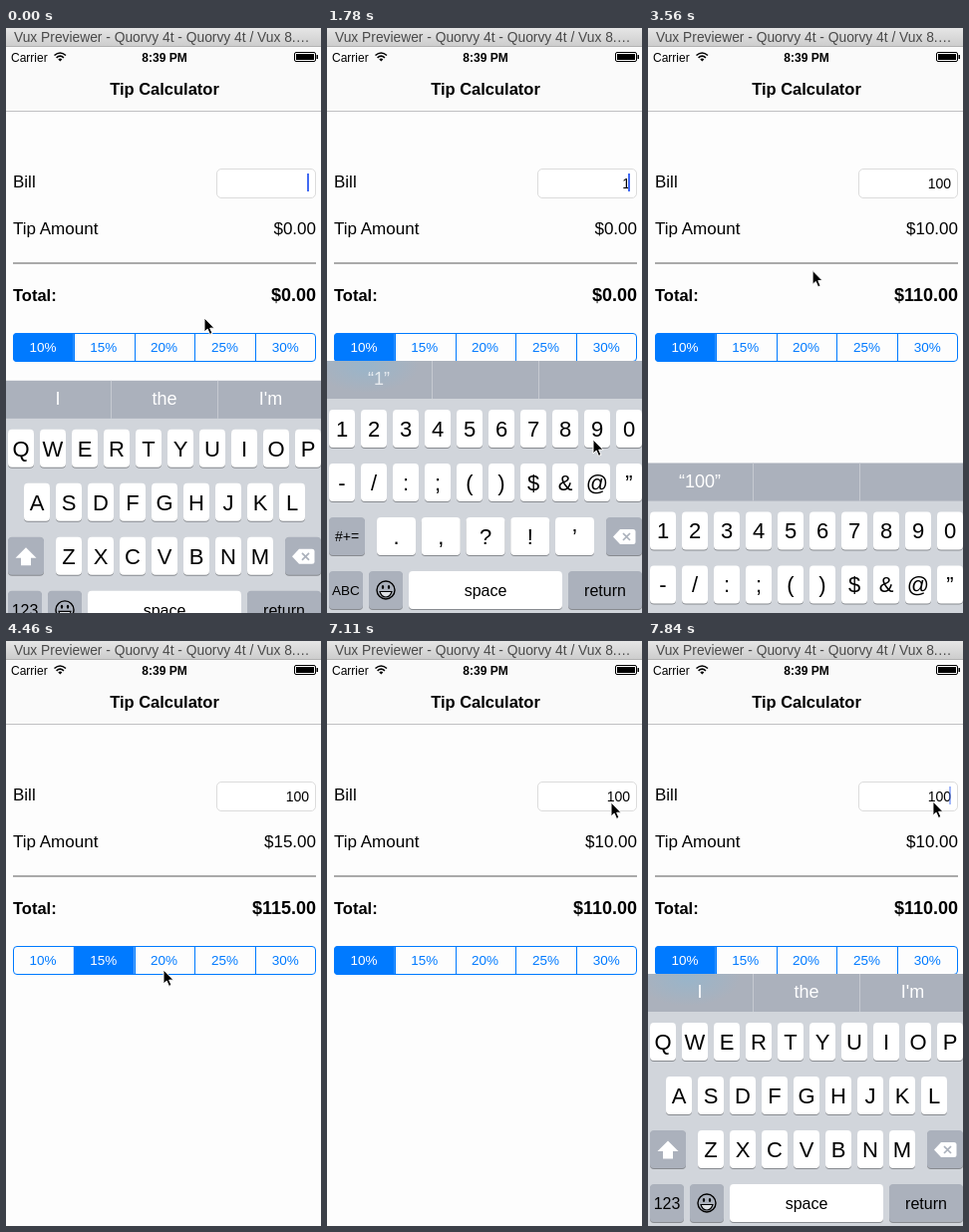
Recreate the animation shown at these times as an HTML page. Size 316x587 px, loop 7.99 s.

```html
<!DOCTYPE html>
<html lang="en">
<head>
<meta charset="utf-8">
<title>Tip Calculator</title>
<style>
html, body { margin: 0; width: 100%; height: 100%; overflow: hidden; background: #fdfdfd; }
svg { display: block; width: 316px; height: 587px; font-family: "Liberation Sans", Arial, sans-serif; }
</style>
</head>
<body>
<svg id="stage" viewBox="0 0 316 587">
  <defs>
    <linearGradient id="chrome" x2="0" y2="1">
      <stop stop-color="#e6e6e6"/><stop offset="1" stop-color="#cdcdcd"/>
    </linearGradient>
    <radialGradient id="tint">
      <stop stop-color="#92b6cf" stop-opacity=".75"/><stop offset="1" stop-color="#92b6cf" stop-opacity="0"/>
    </radialGradient>
    <clipPath id="pill"><rect x="7" y="306" width="304" height="29" rx="4"/></clipPath>
    <clipPath id="barClip"><rect width="316" height="38"/></clipPath>
  </defs>
</svg>
<script>
const LOOP = 7990, KEYBOARD_Y = 334, KEYBOARD_H = 253;
const BLUE = '#007aff', DARK_KEY = '#abb1bc';
const stage = document.getElementById('stage');

function add(parent, tag, attrs, content) {
  const node = document.createElementNS('http://www.w3.org/2000/svg', tag);
  for (const name in attrs) node.setAttribute(name, attrs[name]);
  if (content !== undefined) node.textContent = content;
  return parent.appendChild(node);
}
const rect = (parent, x, y, width, height, fill, more) =>
  add(parent, 'rect', { x, y, width, height, fill, ...more });
const text = (parent, x, y, size, content, more) =>
  add(parent, 'text', { x, y, 'font-size': size, ...more }, content);
const path = (parent, d, more) => add(parent, 'path', { d, ...more });
const BOLD = { 'font-weight': 'bold' };
const MIDDLE = { 'text-anchor': 'middle' };
const END = { 'text-anchor': 'end' };

// Window title, status bar and navigation bar
rect(stage, 0, 0, 316, 587, '#fdfdfd');
rect(stage, 0, 0, 316, 83, '#fafafa');
rect(stage, 0, 83, 316, 1, '#c0c0c2');
rect(stage, 0, 0, 316, 18, 'url(#chrome)');
rect(stage, 0, 18, 316, 1, '#b2b2b2');
text(stage, 8, 13.5, 13.8, 'Vux Previewer - Quorvy 4t - Quorvy 4t / Vux 8.…', { fill: '#4a4a4a' });
text(stage, 5, 33.5, 12, 'Carrier');
path(stage, 'M48.5 27.5Q54.3 22.5 60 27.5M50.6 29.8Q54.3 26.5 57.9 29.8',
  { fill: 'none', stroke: '#000', 'stroke-width': 1.6 });
path(stage, 'M52.3 31.4Q54.3 29.8 56.3 31.4L54.3 33.6Z');
text(stage, 159, 33.5, 12, '8:39 PM', { ...BOLD, ...MIDDLE });
rect(stage, 289.5, 24.5, 21, 9, 'none', { rx: 1.5, stroke: '#000' });
rect(stage, 291, 26, 18, 6, '#000');
rect(stage, 311.5, 27, 1.5, 4, '#000');
text(stage, 159, 67, 16.5, 'Tip Calculator', { ...BOLD, ...MIDDLE });

// Form
text(stage, 7, 160, 17, 'Bill');
rect(stage, 211.5, 141.5, 99, 29, '#fff', { rx: 4.5, stroke: '#dcdcdc' });
const billText = text(stage, 304, 161, 14, '', END);
const caret = rect(stage, 302, 146, 2, 18, '#426bf2');
text(stage, 7, 207, 17, 'Tip Amount');
const tipText = text(stage, 311, 207, 17, '', END);
rect(stage, 7, 235, 304, 2, '#aaa');
text(stage, 7, 274, 16.5, 'Total:', BOLD);
const totalText = text(stage, 311, 274, 18, '', { ...BOLD, ...END });

// Percentage selector
const segments = [10, 15, 20, 25, 30].map((percent, i) => {
  const x = 7 + i * 60.8;
  return {
    fill: rect(stage, x, 306, 60.8, 29, BLUE, { 'clip-path': 'url(#pill)' }),
    label: text(stage, x + 30, 325, 13.5, percent + '%', MIDDLE),
  };
});
for (let i = 1; i < 5; i++) rect(stage, Math.round(7 + i * 60.8), 306, 1, 29, BLUE);
rect(stage, 7.5, 306.5, 303, 28, 'none', { rx: 3.5, stroke: BLUE });

// Keyboard
const keyboard = add(stage, 'g', {});
rect(keyboard, 0, 0, 316, KEYBOARD_H, '#d1d5db');
rect(keyboard, 0, 0, 316, 38, DARK_KEY);
const tint = add(keyboard, 'ellipse',
  { cx: 40, cy: 4, rx: 52, ry: 28, fill: 'url(#tint)', 'clip-path': 'url(#barClip)' });
for (const x of [105, 212]) rect(keyboard, x, 0, 1, 38, '#c6cad1');
const suggestions = [52, 159, 265.5].map(x =>
  text(keyboard, x, 24, 18, '', { ...MIDDLE, fill: '#fff' }));

function key(parent, x, y, width, label = '', size = 22, fill = '#fff') {
  rect(parent, x, y + 1, width, 38, '#888b90', { rx: 4 });
  rect(parent, x, y, width, 38, fill, { rx: 4 });
  text(parent, x + width / 2, y + 19 + size * .36, size, label, MIDDLE);
}
function row(parent, labels, x, y, pitch = 32, width = 26) {
  [...labels].forEach((label, i) => key(parent, x + i * pitch, y, width, label));
}
const letters = add(keyboard, 'g', {});
row(letters, 'QWERTYUIOP', 2, 49);
row(letters, 'ASDFGHJKL', 18, 103);
row(letters, 'ZXCVBNM', 50, 157);
key(letters, 2, 157, 36, '', 16, DARK_KEY);
path(letters, 'M20 167.5L30.5 178H25V185.5H15V178H9.5Z', { fill: '#fff' });
key(letters, 2, 211, 34, '123', 16, DARK_KEY);

const numbers = add(keyboard, 'g', {});
row(numbers, '1234567890', 2, 49);
row(numbers, '-/:;()$&@”', 2, 103);
row(numbers, '.,?!’', 50, 157, 44.75, 39);
key(numbers, 2, 157, 36, '#+=', 14, DARK_KEY);
key(numbers, 2, 211, 34, 'ABC', 13.5, DARK_KEY);

key(keyboard, 280, 157, 36, '', 16, DARK_KEY);
path(keyboard, 'M287 176.5L294 169H307Q309.5 169 309.5 171.5V181.5Q309.5 184 307 184H294Z', { fill: '#fff' });
path(keyboard, 'M297 173L304 180M304 173L297 180', { stroke: DARK_KEY, 'stroke-width': 1.7 });
key(keyboard, 42, 211, 34, '', 16, DARK_KEY);
add(keyboard, 'circle', { cx: 59, cy: 230, r: 9, fill: 'none', stroke: '#000', 'stroke-width': 1.4 });
for (const cx of [56, 62]) add(keyboard, 'ellipse', { cx, cy: 227, rx: 1.2, ry: 2 });
path(keyboard, 'M53 231.5H65Q63.5 237 59 237T53 231.5Z',
  { fill: '#dfe2e6', stroke: '#000', 'stroke-width': 1.1 });
key(keyboard, 82, 211, 154, 'space', 16);
key(keyboard, 242, 211, 74, 'return', 16, DARK_KEY);

const pointer = path(stage, 'M0 0V14L3.2 11.1L5.5 16.4L8 15.3L5.7 10.2H10Z',
  { stroke: '#fff', 'stroke-width': 1, 'stroke-linejoin': 'round' });

// Steps: [time, value...]
const POINTER = [
  [0, 199, 291], [100, 199, 291], [600, 20, 562], [760, 20, 562], [1150, 13, 405],
  [1480, 13, 405], [1780, 267, 413], [1950, 297, 409], [2500, 297, 409], [3260, 168, 240],
  [3500, 168, 240], [4000, 97, 322], [4120, 97, 322], [4460, 158, 330], [4720, 158, 328],
  [5080, 217, 322], [5260, 217, 322], [5490, 278, 318], [5850, 278, 320], [6400, 38, 322],
  [6560, 38, 322], [7110, 285, 162], [LOOP, 286, 161],
];
const BILL = [[0, ''], [1480, '1'], [2050, '10'], [2300, '100']];
const HINTS = [
  [0, 'I', 'the', "I'm"], [1740, '“1”', '', ''], [2200, '“10”', '', ''],
  [2480, '“100”', '', ''], [3850, 'I', 'the', "I'm"],
];
const CHOICE = [[0, 0], [4080, 1], [4650, 2], [5250, 3], [5780, 4], [6500, 0]];
const FOCUS = [[0, 0], [1480], [2050], [2300], [7240]];
const NUMERIC_ON = 700, NUMERIC_OFF = 3800, COMMIT = 3430, FADE = 280;

const clamp = v => Math.max(0, Math.min(1, v));
const mix = (a, b, p) => a + (b - a) * p;
const smooth = p => p * p * (3 - 2 * p);
const indexAt = (steps, t) => steps.findLastIndex(step => step[0] <= t);
const stepAt = (steps, t) => steps[indexAt(steps, t)];
const money = value => '$' + value.toFixed(2);

function pointerAt(t) {
  const i = Math.min(indexAt(POINTER, t), POINTER.length - 2);
  const [from, to] = [POINTER[i], POINTER[i + 1]];
  const p = smooth(clamp((t - from[0]) / (to[0] - from[0])));
  return [mix(from[1], to[1], p), mix(from[2], to[2], p)];
}

function keyboardOffset(t) {
  if (t < 1000) return 20 * (1 - clamp(t / 260)) ** 2;
  if (t < 7300) return KEYBOARD_H * smooth(clamp((t - 3430) / 300));
  return KEYBOARD_H * (1 - clamp((t - 7300) / 480)) ** 3;
}

function caretOpacity(t) {
  if (t > COMMIT && t < 7240) return 0;
  const phase = (t - stepAt(FOCUS, t)[0]) % 1000;
  return phase < 800 ? clamp((700 - phase) / 200) : clamp((phase - 800) / 120);
}

function drawSegments(t) {
  const i = indexAt(CHOICE, t);
  const [since, current] = CHOICE[i];
  const previous = i ? CHOICE[i - 1][1] : current;
  const p = i ? clamp((t - since) / FADE) : 1;
  segments.forEach(({ fill, label }, n) => {
    const level = n === current ? (n === previous ? 1 : mix(.5, 1, p)) : n === previous ? 1 - p : 0;
    fill.setAttribute('opacity', level);
    const white = level > .5 ? 1 : level * .6;
    label.setAttribute('fill', `rgb(${255 * white},${mix(122, 255, white)},255)`);
  });
  return current;
}

function draw(t) {
  const choice = drawSegments(t);
  const bill = t < COMMIT ? 0 : 100;
  const tip = bill * (10 + 5 * choice) / 100;
  billText.textContent = stepAt(BILL, t)[1];
  tipText.textContent = money(tip);
  totalText.textContent = money(bill + tip);
  caret.setAttribute('opacity', caretOpacity(t));

  const offset = keyboardOffset(t);
  keyboard.setAttribute('transform', `translate(0 ${KEYBOARD_Y + offset})`);
  tint.setAttribute('opacity', clamp(1 - offset / 15));
  const numeric = t >= NUMERIC_ON && t < NUMERIC_OFF;
  letters.setAttribute('display', numeric ? 'none' : 'inline');
  numbers.setAttribute('display', numeric ? 'inline' : 'none');
  const [since, ...words] = stepAt(HINTS, t);
  suggestions.forEach((node, i) => {
    node.textContent = words[i];
    node.setAttribute('opacity', since ? clamp(.6 + (t - since) / 300) : 1);
  });
  pointer.setAttribute('transform', `translate(${pointerAt(t)})`);
}

const start = performance.now();
function tick() {
  draw((performance.now() - start) % LOOP);
  requestAnimationFrame(tick);
}
tick();
</script>
</body>
</html>
```
